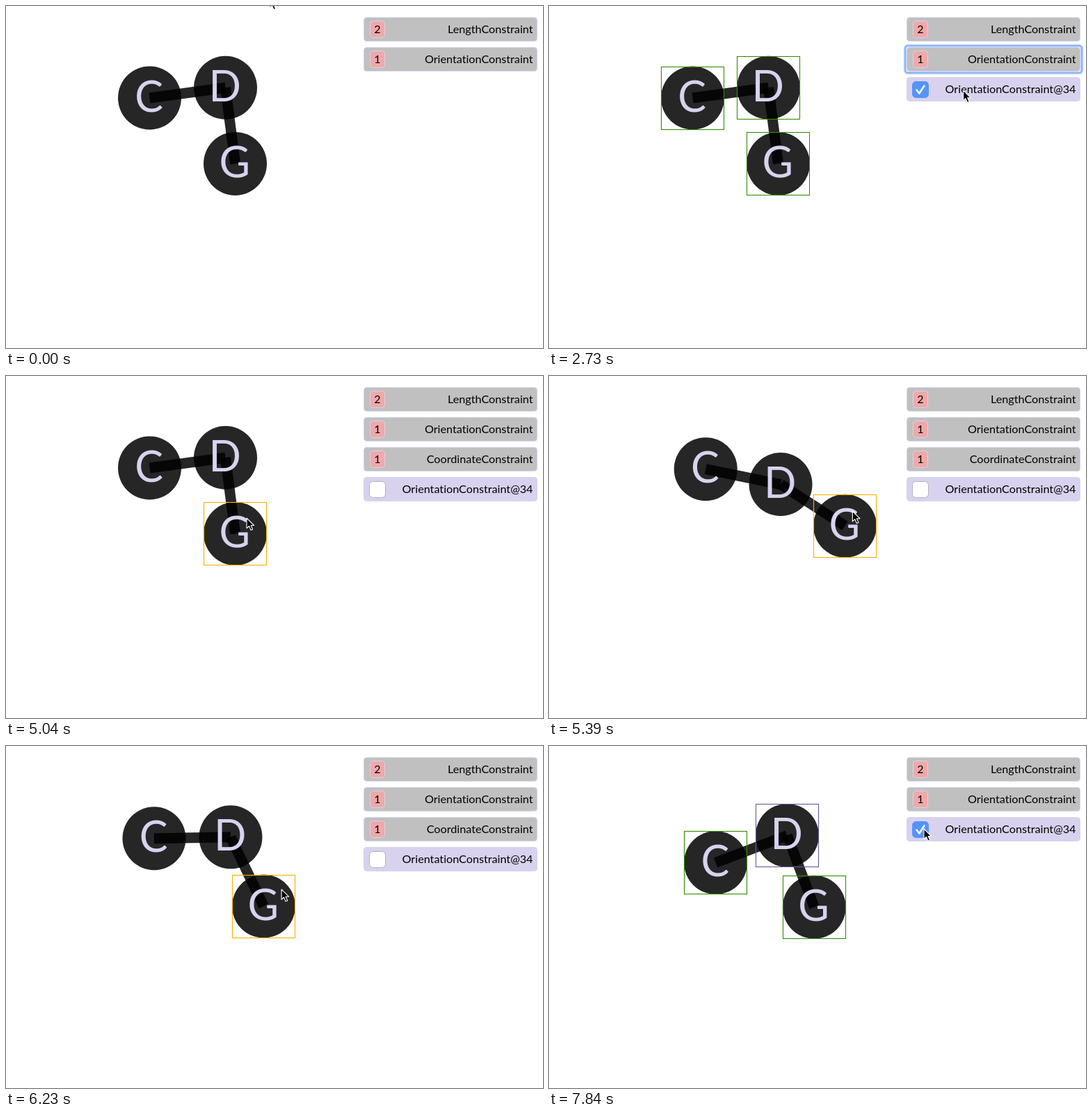
Animation of 772 by 491 pixels, one loop 8 s. Source, as an HTML page:

```html
<!DOCTYPE html>
<html lang="en">
<head>
<meta charset="utf-8">
<title>Constraint playground</title>
<style>
  html, body { margin: 0; width: 100%; height: 100%; overflow: hidden; background: #fff; }
  svg {
    display: block; width: 772px; height: 491px;
    font-family: Lato, "Open Sans", sans-serif; font-variant-ligatures: none;
  }
  .label { font-size: 16.2px; text-anchor: end; }
  .count { font-size: 16px; text-anchor: middle; }
  .letter { font-size: 61px; text-anchor: middle; fill: #d8d2ee; }
  .link { stroke: #000; stroke-opacity: .85; stroke-width: 15; }
  .frame { fill: none; stroke-width: 1.1; }
  .ring { fill: none; stroke: #8ab5fa; }
</style>
</head>
<body>
<svg id="stage" viewBox="0 0 772 491"></svg>
<script>
const LOOP = 8000, STEP = 70, LINK = 110, RADIUS = 45.5, LAG = 60;
const GREEN = '#338c00', SLATE = '#625b96', ORANGE = '#f5b000';
const CLICK_TYPE = 1890, ITEM_IN = 1960, UNCHECK = 4130, GRAB = 5040, DROP = 6650, RECHECK = 7630;
const HOLD = 140;
const stage = document.getElementById('stage');

function add(tag, attrs, parent = stage, text = '') {
  const el = document.createElementNS('http://www.w3.org/2000/svg', tag);
  set(el, attrs);
  el.textContent = text;
  parent.append(el);
  return el;
}
function set(el, attrs) {
  for (const key in attrs) el.setAttribute(key, attrs[key]);
}
function show(el, on) {
  el.style.display = on ? '' : 'none';
}
const within = (t, from, to) => t >= from && t < to;
const clamp = k => Math.min(1, Math.max(0, k));
const smooth = k => k * k * (3 - 2 * k);
const mix = (a, b, k) => a.map((v, i) => v + (b[i] - v) * k);

// The hand moves in eased strokes and rests between them.
const home = [379, -12];
const strokes = [
  { from: 70, to: 700, at: [506, 50] },
  { from: 700, to: 910, at: [523, 33] },
  { from: 1400, to: 1680, at: [536, 67] },
  { from: 2030, to: 2450, at: [608, 122] },
  { from: 2660, to: 2870, at: [560, 119] },
  { from: 2940, to: 3500, at: [533, 118] },
  { from: 4410, to: 4900, at: [346, 204] },
  { from: 5040, to: 5250, at: [445, 192] },
  { from: 5250, to: 5930, at: [366, 212] },
  { from: 5930, to: 6580, at: [434, 198] },
  { from: 6580, to: 7350, at: [539, 119] }
];
function hand(t) {
  return strokes.reduce(
    (p, s) => mix(p, s.at, smooth(clamp((t - s.from) / (s.to - s.from)))), home);
}

// The dragged end trails the hand and pulls the far end softly along.
function ends(t) {
  const [x, y] = hand(Math.min(Math.max(t, GRAB), DROP - STEP) - LAG * (t < DROP - STEP));
  const tip = [x - 16.5, y + 22.4];
  const base = [Math.max(206.5, 213.2 + .223 * (tip[0] - 371.5)), 132 + .017 * (tip[0] - 329.5)];
  const k = 1 - (1 - clamp((t - RECHECK - STEP) / HOLD)) ** 2;
  return [mix(base, [239.6, 167.5], k), mix(tip, [381.3, 231.3], k)];
}

// The joint that keeps both links at their fixed length.
function elbow([ax, ay], [bx, by]) {
  const dx = bx - ax, dy = by - ay, d = Math.hypot(dx, dy);
  const h = Math.sqrt(Math.max(0, LINK * LINK - d * d / 4)) / d;
  return [(ax + bx) / 2 + dy * h, (ay + by) / 2 - dx * h];
}

const discs = [0, 1, 2].map(() => add('circle', { r: RADIUS, fill: '#262626' }));
const links = [0, 1].map(() => add('line', { class: 'link' }));
const letters = ['C', 'D', 'G'].map(ch => add('text', { class: 'letter' }, stage, ch));
const frames = [0, 1, 2].map(() => add('rect', { class: 'frame', width: 90, height: 90 }));

function place(row, slot) {
  row.setAttribute('transform', `translate(514 ${16 + 43 * slot})`);
}
function makeRow(slot, label, fill) {
  const row = add('g', {});
  add('rect', { x: .5, y: .5, width: 249, height: 34, rx: 4, fill, stroke: '#d8d2ee' }, row);
  add('text', { class: 'label', x: 243.5, y: 23 }, row, label);
  place(row, slot);
  return row;
}
function makeType(slot, label, count) {
  const row = makeRow(slot, label, '#c0c0c0');
  add('rect', { x: 9.5, y: 5.5, width: 21, height: 24, rx: 4, fill: '#efa9a9', stroke: '#d8d2ee' }, row);
  add('text', { class: 'count', x: 20, y: 23 }, row, count);
  return row;
}

makeType(0, 'LengthConstraint', '2');
const typeRow = makeType(1, 'OrientationConstraint', '1');
const coordRow = makeType(2, 'CoordinateConstraint', '1');
const itemRow = makeRow(2, 'OrientationConstraint@34', '#d8d2ee');
const box = add('rect', { x: 8.5, y: 6.5, width: 23, height: 23, rx: 5 }, itemRow);
const check = add('path', {
  d: 'M14.5 18.5 L18.3 23.5 L25.5 12.5', fill: 'none', stroke: '#fff',
  'stroke-width': 2.4, 'stroke-linecap': 'round', 'stroke-linejoin': 'round'
}, itemRow);
const focus = add('g', {}, typeRow);
for (const [width, opacity] of [[5, .35], [2.4, 1]]) {
  add('rect', {
    class: 'ring', x: -2, y: -2, width: 254, height: 39, rx: 4,
    'stroke-width': width, 'stroke-opacity': opacity
  }, focus);
}
const cursor = add('path', {
  d: 'M0 0 V14.6 L3.4 11.4 L6 17.3 L8.6 16.2 L6.1 10.5 H10.6 Z',
  fill: '#000', stroke: '#fff', 'stroke-width': 1.1, 'stroke-linejoin': 'round'
});

function drawChain(t, hover, drag) {
  const [base, tip] = ends(t);
  const points = [base, elbow(base, tip), tip];
  const solved = t >= RECHECK + HOLD;
  points.forEach(([x, y], i) => {
    set(discs[i], { cx: x, cy: y });
    set(letters[i], { x: x - .8, y: y + 19.6 });
    set(frames[i], {
      x: Math.floor(x - 45) + .5, y: Math.floor(y - 45) + .5,
      stroke: drag ? ORANGE : solved && i === 1 ? SLATE : GREEN
    });
    show(frames[i], hover || (drag && i === 2));
  });
  links.forEach((link, i) => {
    const [x1, y1] = points[i], [x2, y2] = points[i + 1];
    set(link, { x1, y1, x2, y2 });
  });
}

function drawList(t, drag) {
  const checked = !within(t, UNCHECK + HOLD, RECHECK + HOLD);
  const pressed = within(t, UNCHECK, UNCHECK + HOLD) || within(t, RECHECK, RECHECK + HOLD);
  show(itemRow, t >= ITEM_IN);
  show(coordRow, drag);
  place(itemRow, drag ? 3 : 2);
  show(focus, within(t, CLICK_TYPE, UNCHECK));
  show(check, checked);
  const fill = checked ? (pressed ? '#316fee' : '#5594fc') : (pressed ? '#e4e4e4' : '#fff');
  set(box, { fill, stroke: checked ? fill : '#b4b2bc' });
}

function draw(t) {
  const [x, y] = hand(t);
  const drag = within(t, GRAB, DROP);
  const hover = t >= ITEM_IN && !drag && within(x, 514, 764) && within(y, 102, 137);
  drawChain(t, hover, drag);
  drawList(t, drag);
  cursor.setAttribute('transform', `translate(${x} ${y})`);
}

function run() {
  draw(Math.floor(performance.now() % LOOP / STEP) * STEP);
  requestAnimationFrame(run);
}
run();
</script>
</body>
</html>
```
